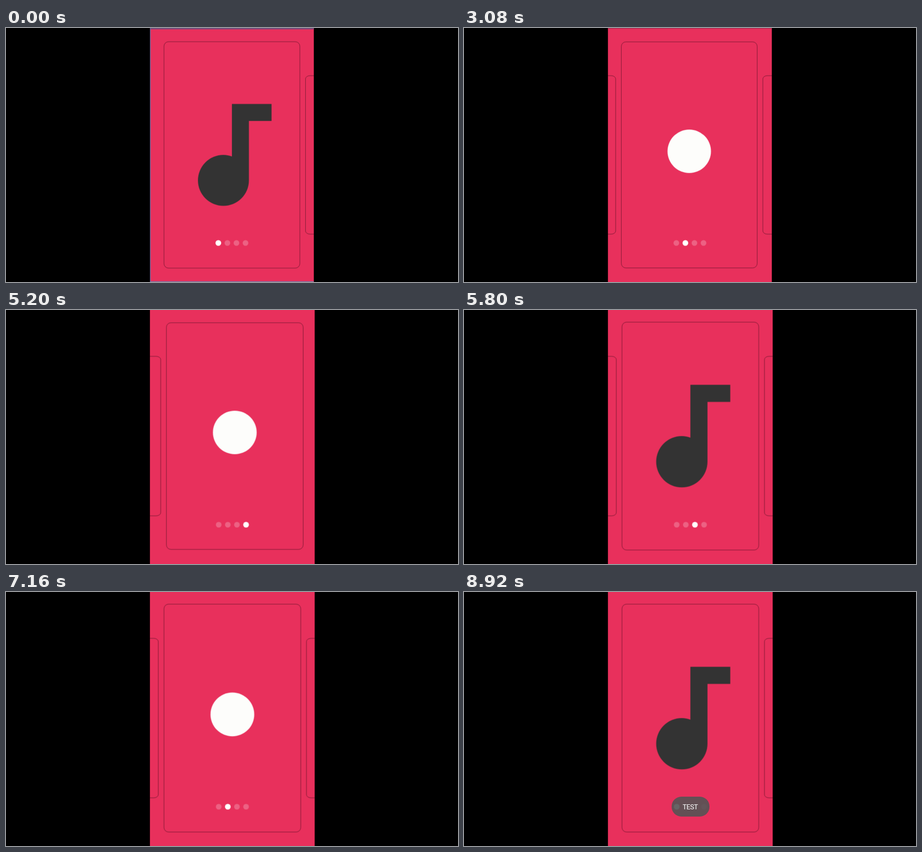
An HTML page without scripts that plays this animation: 998 by 561 pixels, repeating every 9.28 s.

```html
<!DOCTYPE html>
<html lang="en">
<head>
<meta charset="utf-8">
<title>Card carousel</title>
<style>
  @property --page { syntax: "<number>"; inherits: true; initial-value: 0; }

  html, body { margin: 0; width: 100%; height: 100%; overflow: hidden; background: #000; }
  svg { display: block; width: 100%; height: 100%; }

  .screen, .deck, .topline, .flash, .toast {
    animation: 9280ms infinite;
  }

  /* the recording is cropped a little differently after the second swipe */
  .screen { animation-name: crop; animation-timing-function: step-end; }
  @keyframes crop {
    0% { transform: translate(498.8px, 280.3px); }
    41.38%, 100% { transform: translate(499.8px, 278.4px) scale(1.0066); }
  }

  .deck { animation-name: swipe; animation-timing-function: cubic-bezier(.35, .1, .25, 1); }
  @keyframes swipe {
    0%, 22.31% { --page: 0; }
    29.85%, 33.08% { --page: 1; }
    41.38% { --page: 2; }
    45.91%, 55.76% { --page: 3; }
    62.5%, 67.89% { --page: 2; }
    74.78%, 80.17% { --page: 1; }
    87.18%, 100% { --page: 0; }
  }

  .p0 { --i: 0; }
  .p1 { --i: 1; }
  .p2 { --i: 2; }
  .p3 { --i: 3; }
  .card, .dot {
    --off: calc(var(--i) - var(--page));
    --dist: max(var(--off), -1 * var(--off));
  }
  .card {
    transform: translateX(calc(var(--off) * 312.5px))
               scaleY(calc(1 - .3 * min(1, var(--dist) * 1.0417)));
  }
  .dot {
    fill: #fff;
    opacity: calc(.24 + .76 * clamp(0, (.5 - var(--dist)) * 1000, 1));
  }
  .edge {
    fill: none;
    stroke: #260a16;
    stroke-opacity: .65;
    stroke-width: .9;
    vector-effect: non-scaling-stroke;
  }

  .topline { animation-name: topline; animation-timing-function: step-end; }
  @keyframes topline {
    0% { opacity: 1; }
    41.38%, 100% { opacity: 0; }
  }

  .flash { animation-name: flash; animation-timing-function: linear; }
  @keyframes flash {
    0%, .4% { opacity: 1; }
    1.29%, 100% { opacity: 0; }
  }

  .toast { animation-name: toast; animation-timing-function: linear; }
  @keyframes toast {
    0%, 89.44% { opacity: 0; }
    96.12%, 100% { opacity: 1; }
  }
  .toast text { font: 15px Roboto, sans-serif; letter-spacing: -.4px; fill: #fff; text-anchor: middle; }
</style>
</head>
<body>
<svg viewBox="0 0 998 561">
  <defs>
    <clipPath id="window"><rect x="-180.6" y="-300" width="361.2" height="600"/></clipPath>
    <rect id="frame" class="edge" x="-150" y="-250" width="300" height="500" rx="10"/>
    <g id="song">
      <use href="#frame"/>
      <path fill="#333" transform="scale(12.5) translate(-12 -12)"
        d="M12 3v9.28c-.47-.17-.97-.28-1.5-.28a4.5 4.5 0 1 0 4.5 4.5V6h4V3z"/>
    </g>
    <g id="badge">
      <use href="#frame"/>
      <circle cy="-8" r="48" fill="#fdfdfb"/>
    </g>
  </defs>

  <rect width="998" height="561"/>

  <g class="screen">
    <g class="deck" clip-path="url(#window)">
      <rect x="-181" y="-300" width="362" height="600" fill="#e8305c"/>
      <g class="card p0"><use href="#song"/></g>
      <g class="card p1"><use href="#badge"/></g>
      <g class="card p2"><use href="#song"/></g>
      <g class="card p3"><use href="#badge"/></g>
      <g transform="translate(0 194.5)">
        <circle class="dot p0" cx="-30" r="6.3"/>
        <circle class="dot p1" cx="-10" r="6.3"/>
        <circle class="dot p2" cx="10" r="6.3"/>
        <circle class="dot p3" cx="30" r="6.3"/>
      </g>
    </g>
  </g>

  <rect class="topline" x="318" width="361.6" height="1.5" fill="#a52c50"/>

  <g class="flash">
    <rect x="318" width="361.6" height="3" fill="#7c4a78"/>
    <rect x="318" width="1.3" height="561" fill="#5570a8"/>
    <rect x="318" y="559.7" width="361.6" height="1.3" fill="#5a8fb8"/>
  </g>

  <g class="toast">
    <rect x="458.5" y="452" width="83.5" height="44" rx="21.5" fill="#555" fill-opacity=".9"/>
    <text x="499.5" y="480.4">TEST</text>
  </g>
</svg>
</body>
</html>
```
